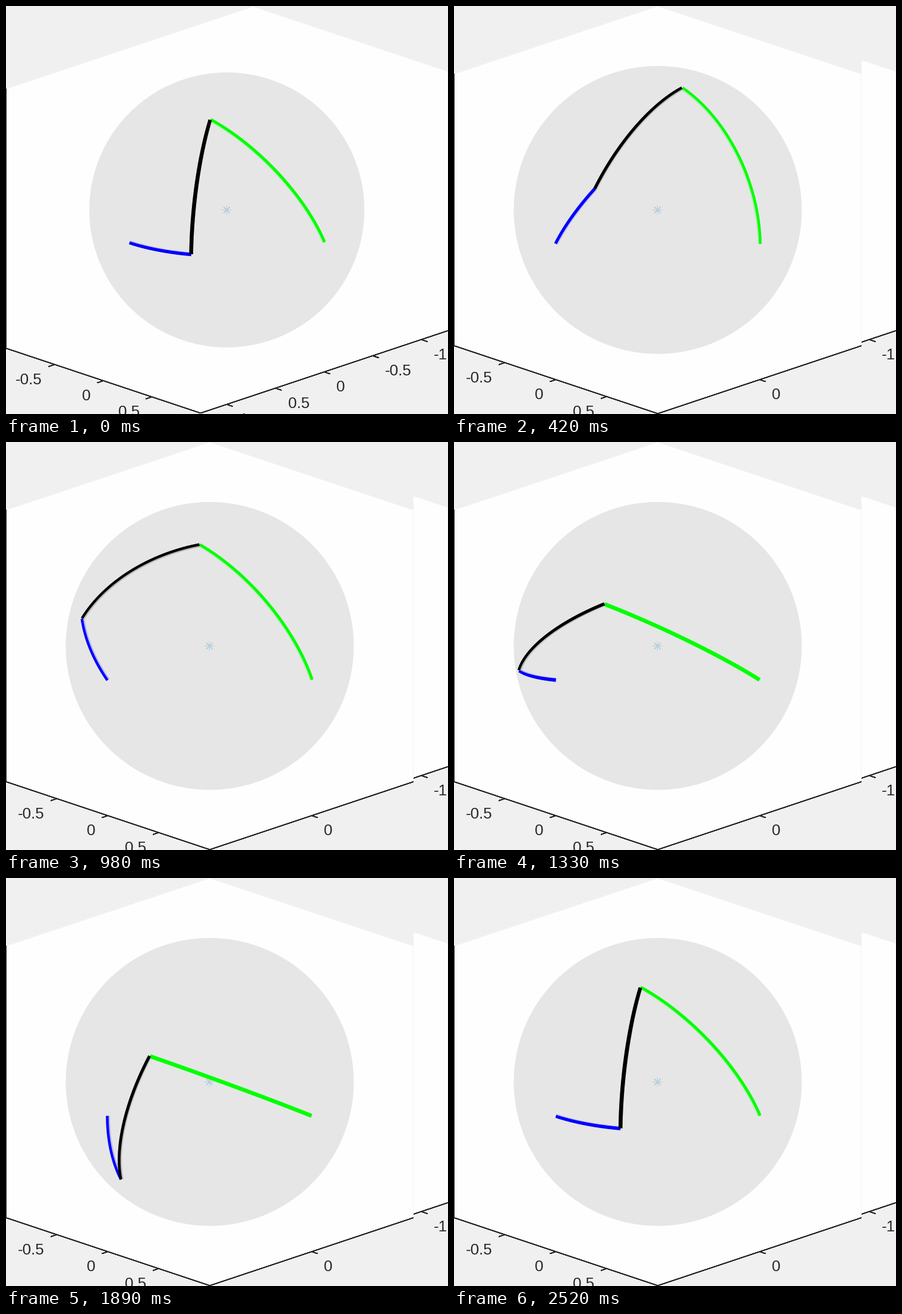
A matplotlib script for the animation above (2.59 s loop, 744 by 687 pixels).

```python
import itertools

import numpy as np
import matplotlib.pyplot as plt
from matplotlib.animation import FuncAnimation
from matplotlib.patches import Circle, Polygon

W, H, DPI = 744, 687, 100
FRAMES, INTERVAL = 37, 70
PT = 72 / DPI
CY = 343.4

BG, WALL = "#f0f0f0", "#fefefe"
BALL = np.full(3, 230 / 255)
INK = "#262626"
BLUE, BLACK, GREEN = (0, 0, 1), (0, 0, 0), (0, 1, 0)
STAR = (0, 114 / 255, 189 / 255)
OPACITY = 0.8

# Rows: screen right, screen up, towards the viewer, seen from (1, 1, 0.5)
VIEW = np.array([[-1 / 2**.5, 1 / 2**.5, 0],
                 [-2**.5 / 6, -2**.5 / 6, 2 * 2**.5 / 3],
                 [2 / 3, 2 / 3, 1 / 3]])

# Spherical four-bar linkage
CRANK, COUPLER, FOLLOWER = np.radians([30, 60, 75])
PIVOT_X, PIVOT_Y = np.array([1., 0, 0]), np.array([0, 1., 0])
LINK_PX = 20 / 3
SAG = 0.0033  # the faceted ball lies this far below the true sphere

fig = plt.figure(figsize=(W / DPI, H / DPI), dpi=DPI, facecolor=BG)
ax = fig.add_axes([0, 0, 1, 1])


class Scene:
    """One camera framing: centre, ball radius, half depth of the box, ticks."""

    def __init__(self, cx, radius, xmax, xticks):
        self.cx, self.radius, self.xmax, self.xticks = cx, radius, xmax, xticks

    def px(self, flat):
        return np.array([self.cx, CY]) + self.radius * np.asarray(flat) * [1, -1]

    def at(self, x, y, z):
        return self.px(VIEW[:2] @ np.array([x, y, z]))


FIRST = Scene(371.7, 231.5, 1.27, (-1, -.5, 0, .5, 1))
REST = Scene(343.0, 242.4, 1.0, (0,))
layer = itertools.count(1)


def fill(points, color):
    ax.add_patch(Polygon(points, closed=True, fc=color, ec="none", lw=0,
                         zorder=next(layer)))


def stroke(points, color=INK):
    xs, ys = np.transpose(points)
    ax.plot(xs, ys, color=color, lw=PT, solid_capstyle="butt",
            antialiased=False, snap=False, zorder=next(layer))


def veiled(color):
    return tuple(OPACITY * BALL + (1 - OPACITY) * np.array(color))


def tick(point, value, side):
    stroke([point, point + np.array([side * 10, 3.3])])
    ax.text(point[0] + side * 21, point[1] + 33.2, f"{value:g}",
            family="Liberation Sans", size=26 * PT, color=INK,
            ha="left" if side > 0 else "right", va="baseline", zorder=next(layer))


def draw_box(s):
    m = s.xmax
    fill([s.at(m, -1, -1), s.at(m, -1, 1), s.at(-m, -1, 1),
          s.at(-m, 1, 1), s.at(-m, 1, -1), s.at(m, 1, -1)], WALL)
    left, front, right = s.at(m, -1, -1), s.at(m, 1, -1), s.at(-m, 1, -1)
    stroke([left, front, right])
    stroke([(.5, s.at(m, -1, 1)[1]), (.5, left[1])])
    for v in (-.5, 0, .5):
        tick(s.at(m, v, -1), v, -1)
    for v in s.xticks:
        tick(s.at(v, 1, -1), v, 1)


def draw_ball(s):
    ax.add_patch(Circle((s.cx, CY), s.radius, fc=tuple(BALL), ec="none", lw=0,
                        zorder=next(layer)))
    center = np.array([np.floor(s.cx - .5) + .5, 343.5])
    for k in range(4):
        d = np.array([np.cos(k * np.pi / 4), np.sin(k * np.pi / 4)])
        reach = 7 if k % 2 else 8
        stroke([center - reach * d, center + reach * d], veiled(STAR))


def draw_link(s, start, end, color):
    """A wide line on the ball; the half facing the centre sinks below it."""
    angle = np.arccos(start @ end)
    t = np.linspace(0, 1, 120)
    p = (np.outer(start, np.sin((1 - t) * angle))
         + np.outer(end, np.sin(t * angle))) / np.sin(angle)
    flat = VIEW[:2] @ p
    tangent = np.gradient(flat, axis=1)
    tangent /= np.hypot(*tangent)
    normal = np.array([-tangent[1], tangent[0]])

    half = LINK_PX / 2 / s.radius
    out = (flat * normal).sum(axis=0)
    reach = np.abs(out)
    clear = reach**2 - 2 * SAG
    under = np.where(clear < 0, half, reach - np.sqrt(np.maximum(clear, 0)))
    under = np.minimum(under, half)
    low = np.where(out >= 0, -under, -half)
    high = np.where(out >= 0, half, under)

    def ribbon(a, b, c):
        one, two = flat + a * normal, flat + b * normal
        fill(s.px(np.hstack([one, two[:, ::-1]]).T), c)

    return (lambda: ribbon(-half, half, veiled(color)),
            lambda: ribbon(low, high, color))


def joints(theta):
    p = np.array([np.cos(CRANK), np.sin(CRANK) * np.cos(theta),
                  np.sin(CRANK) * np.sin(theta)])
    k, cp, cf = p @ PIVOT_Y, np.cos(COUPLER), np.cos(FOLLOWER)
    a = (cp - k * cf) / (1 - k * k)
    b = (cf - k * cp) / (1 - k * k)
    c = np.sqrt((1 - a * cp - b * cf) / (1 - k * k))
    return p, a * p + b * PIVOT_Y + c * np.cross(p, PIVOT_Y)


def draw(i):
    global layer
    layer = itertools.count(1)
    ax.clear()
    ax.set(xlim=(0, W), ylim=(H, 0))
    ax.axis("off")

    draw_box(FIRST)
    scene = FIRST
    if i > 0:
        # The narrower view leaves a strip of the first one at the right
        scene = REST
        fill([(0, 0), (686, 0), (686, H), (0, H)], BG)
        draw_box(REST)
        stroke([(685.5, 92), (685.5, 571)], BG)
    draw_ball(scene)

    p, q = joints(2 * np.pi * i / (FRAMES - 1))
    links = [draw_link(scene, PIVOT_X, p, BLUE),
             draw_link(scene, PIVOT_Y, q, GREEN),
             draw_link(scene, p, q, BLACK)]
    for part in (0, 1):
        for link in links:
            link[part]()
    return []


anim = FuncAnimation(fig, draw, frames=FRAMES, interval=INTERVAL,
                     init_func=lambda: [], repeat=True, repeat_delay=0)
plt.show()
```
